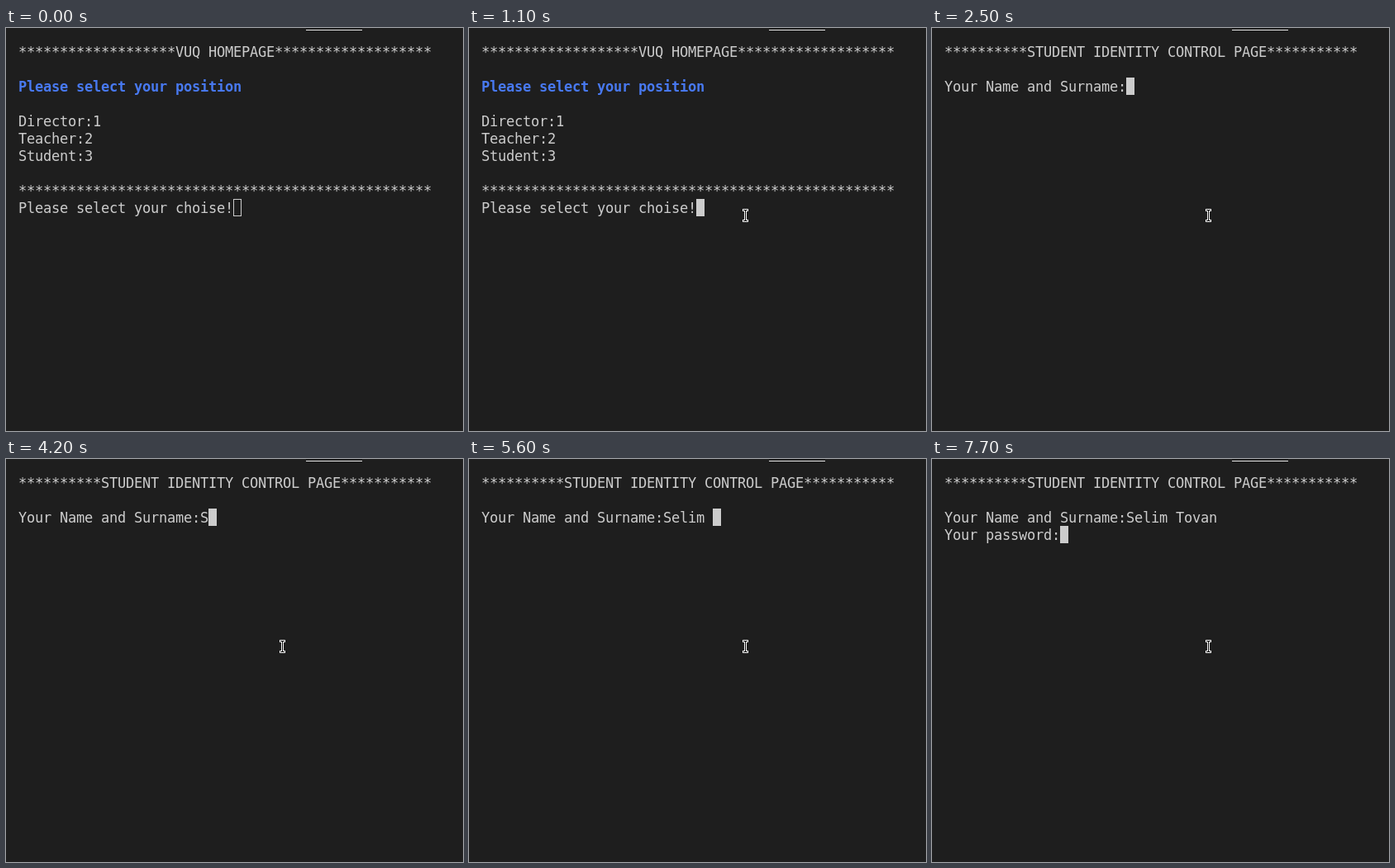
Animation of 553x488 px, one loop 8 s. Source, as an HTML page:

```html
<!DOCTYPE html>
<html lang="en">
<head>
<meta charset="utf-8">
<title>Terminal</title>
<style>
  html, body { margin: 0; width: 100%; height: 100%; overflow: hidden; background: #1e1e1e; }
  svg { display: block; }
  text {
    font: 17px "DejaVu Sans Mono", monospace;
    letter-spacing: calc(10px - 1ch);
    white-space: pre;
    fill: #ccc;
  }
  .prompt { font-weight: bold; fill: #4879f0; }
</style>
</head>
<body>
<svg width="553" height="488" viewBox="0 0 553 488">
  <rect x="363" y="2" width="68" height="1" fill="#e7e7e7"/>
  <g id="lines"></g>
  <rect id="caret" width="9" height="20" stroke="#ccc"/>
  <g id="pointer" shape-rendering="crispEdges">
    <path d="M-3-8h7v3h-2v10h2v3h-7v-3h2v-10h-2z" fill="#fff"/>
    <path d="M-2-7h5v1h-2v12h2v1h-5v-1h2v-12h-2z" fill="#000"/>
  </g>
</svg>
<script>
const LOOP = 8000, LEFT = 15, TOP = 18, CELL = 10, ROW = 21, BASE = 17;
const FOCUS = 700, PAGE = 2500, ENTER = 7700;
const stars = n => '*'.repeat(n);

const menu = [
  stars(19) + 'VUQ HOMEPAGE' + stars(19),
  '',
  'Please select your position',
  '',
  'Director:1',
  'Teacher:2',
  'Student:3',
  '',
  stars(50),
  'Please select your choise!'
];
const login = [
  stars(10) + 'STUDENT IDENTITY CONTROL PAGE' + stars(11),
  '',
  'Your Name and Surname:'
];

const choice = { text: '3', times: [2200] };
const name = {
  text: 'Selim Tovan',
  times: [4200, 4900, 5100, 5200, 5400, 5600, 5900, 6200, 6900, 7200, 7300]
};

// Pointer positions, one every 100 ms
const path = [
  [96, 231], [150, 230], [215, 229], [280, 229], [330, 228], [358, 228],
  [370, 227], [352, 227], [333, 226], [333, 227], [334, 227]
];

const [lines, caret, pointer] =
  ['lines', 'caret', 'pointer'].map(id => document.getElementById(id));

const typed = (entry, t) => entry.text.slice(0, entry.times.filter(at => at <= t).length);

function screen(t) {
  const page = (t < PAGE ? menu : login).slice();
  page[page.length - 1] += typed(t < PAGE ? choice : name, t);
  if (t >= ENTER) page.push('Your password:');
  return page;
}

function put(el, attrs) {
  for (const key in attrs) el.setAttribute(key, attrs[key]);
  return el;
}

let shown = '';
function write(page) {
  const key = page.join('\n');
  if (key === shown) return;
  shown = key;
  lines.replaceChildren(...page.map((line, i) => {
    const el = document.createElementNS('http://www.w3.org/2000/svg', 'text');
    el.textContent = line;
    if (line === menu[2]) el.setAttribute('class', 'prompt');
    return put(el, { x: LEFT, y: TOP + i * ROW + BASE });
  }));
}

function draw(t) {
  const page = screen(t), last = page.length - 1;
  write(page);
  put(caret, {
    x: LEFT + page[last].length * CELL + 0.5,
    y: TOP + last * ROW + 0.5,
    fill: t < FOCUS ? 'none' : '#ccc'
  });

  const step = Math.min(Math.floor(t / 100) - 1, path.length - 1);
  const [x, y] = path[Math.max(step, 0)];
  put(pointer, {
    transform: `translate(${x} ${y})`,
    visibility: step < 0 ? 'hidden' : 'visible'
  });
}

const start = performance.now();
function tick() {
  draw((performance.now() - start) % LOOP);
  requestAnimationFrame(tick);
}
tick();
</script>
</body>
</html>
```
